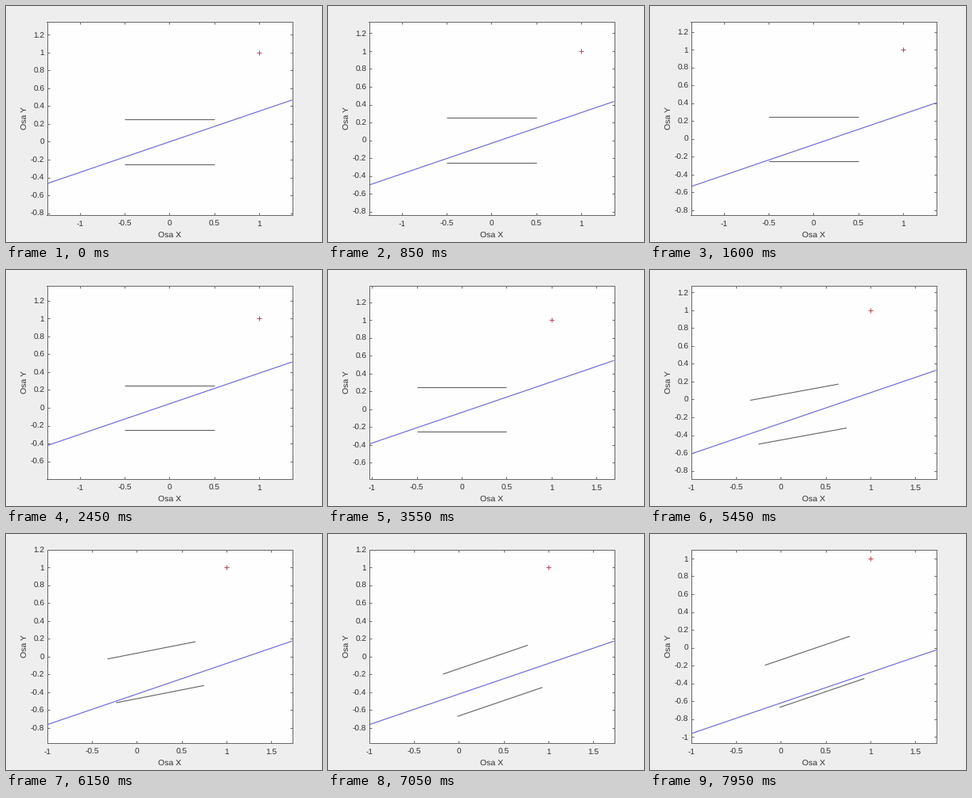
These frames come from a looping animation (397 px wide and 298 px high, 8000 ms). A matplotlib script:

```python
import numpy as np
import matplotlib.pyplot as plt
from matplotlib.animation import FuncAnimation
from matplotlib.ticker import FuncFormatter, MultipleLocator

W, H, DPI = 397, 298, 100
FRAMES, INTERVAL = 160, 50
PX = 72 / DPI                      # points per pixel

SCALE = 112.7                      # pixels per data unit
BOX_W, BOX_H = 308, 244
BOX_LEFT, BOX_BOTTOM = 51.5, 263.5
HALF_W, HALF_H = BOX_W / SCALE / 2, BOX_H / SCALE / 2

SLOPE = 0.343
TOUCH = 0.25 - 0.5 * SLOPE         # offset at which the line meets a plate
PIVOT = np.array([1.0, 1.0])
PLATES = [np.array([[-0.5, y], [0.5, y]]) for y in (0.25, -0.25)]

FINAL_SHIFT = HALF_W - 1.0005      # leaves the tick at -1 just in view
SHIFT_TIMES = [53, 55, 56, 57, 60, 62, 64, 66, 68, 71, 73]
LIFT_TIMES = [2, 38, 52, 95, 100.6, 121, 142, 159]
LIFT = [0, -TOUCH, TOUCH, TOUCH, -0.036, -0.294, -0.294, -0.494]
TURN_STEP, TURN_RATE = 0.706, 12 / 17
FIRST_TURN, FULL_TURN = 10.45, np.degrees(np.arctan(SLOPE))


def turn(i, start, total):
    """Stepwise rotation in degrees, beginning after frame `start`."""
    steps = np.ceil(max(0, i - start) * TURN_RATE - 1e-9)
    return min(total, steps * TURN_STEP)


def rotate(points, degrees):
    a = np.radians(degrees)
    m = np.array([[np.cos(a), -np.sin(a)], [np.sin(a), np.cos(a)]])
    return (points - PIVOT) @ m.T + PIVOT


def pose(i):
    """Line centre and plate angle."""
    xc = FINAL_SHIFT * np.searchsorted(SHIFT_TIMES, i, side="right") / len(SHIFT_TIMES)
    yc = np.interp(i, LIFT_TIMES, LIFT)
    angle = turn(i, 74, FIRST_TURN) + turn(i, 122, FULL_TURN - FIRST_TURN)
    return xc, yc, angle


plt.rcParams.update({"font.family": "Liberation Sans", "text.hinting": "none"})
fig = plt.figure(figsize=(W / DPI, H / DPI), dpi=DPI, facecolor="#eeeeee")
ax = fig.add_axes([BOX_LEFT / W, 1 - BOX_BOTTOM / H, BOX_W / W, BOX_H / H],
                  facecolor="#fefefe")

INK, EDGE = "#303030", "#686868"
for spine in ax.spines.values():
    spine.set(color=EDGE, linewidth=PX)
ax.tick_params(direction="in", top=True, right=True, length=3 * PX, width=PX,
               color=EDGE, labelcolor=INK, labelsize=10.1 * PX)
ax.tick_params(axis="x", pad=7 * PX)
ax.tick_params(axis="y", pad=3.3 * PX)

number = FuncFormatter(lambda v, _: f"{round(v, 1) + 0.0:g}")
for axis, step in ((ax.xaxis, 0.5), (ax.yaxis, 0.2)):
    axis.set_major_locator(MultipleLocator(step))
    axis.set_major_formatter(number)

label = dict(fontsize=10.5 * PX, color=INK, ha="center", va="baseline")
fig.text(206 / W, 1 - 292.6 / H, "Osa X", **label)
fig.text(27 / W, 1 - 141.5 / H, "Osa Y", rotation=90, rotation_mode="anchor", **label)

stroke = dict(lw=1.15 * PX, solid_capstyle="butt")
plates = [ax.plot([], [], color="#666666", **stroke)[0] for _ in PLATES]
line, = ax.plot([], [], color="#6a66d6", **stroke)
ax.plot(*PIVOT, "+", color="#b8485a", ms=6 * PX, mew=PX)


def update(i):
    xc, yc, angle = pose(i)
    rise = SLOPE * HALF_W
    line.set_data([xc - HALF_W, xc + HALF_W], [yc - rise, yc + rise])

    low = yc - rise
    for artist, ends in zip(plates, PLATES):
        ends = rotate(ends, angle)
        artist.set_data(ends[:, 0], ends[:, 1])
        low = min(low, ends[:, 1].min())

    # the view stays centred on the vertical extent of the data
    mid = (PIVOT[1] + low) / 2
    ax.set_xlim(xc - HALF_W, xc + HALF_W)
    ax.set_ylim(mid - HALF_H, mid + HALF_H)
    return [line, *plates]


anim = FuncAnimation(fig, update, frames=FRAMES, interval=INTERVAL,
                     repeat=True, repeat_delay=0, blit=False)
plt.show()
```
